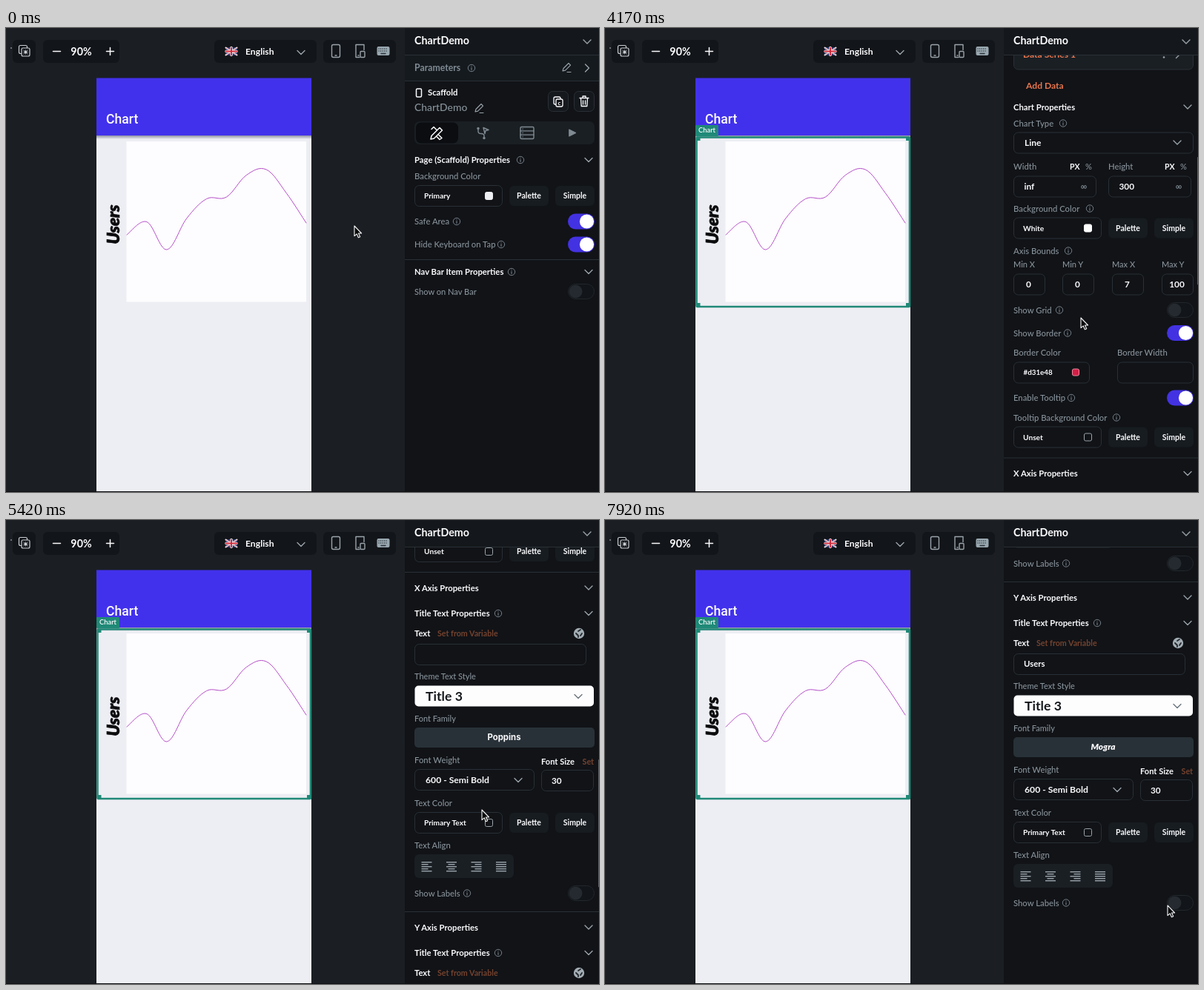
Write an HTML page that moves like this. It is 800 px wide and 626 px high and loops after 8000 ms.

```html
<!DOCTYPE html>
<html lang="en">
<head>
<meta charset="utf-8">
<title>Chart builder</title>
<style>
  html, body { margin: 0; width: 100%; height: 100%; overflow: hidden; background: #1b1f23; }
  svg { display: block; width: 800px; height: 626px; font-family: Lato, sans-serif; }
</style>
</head>
<body>
<svg id="stage" viewBox="0 0 800 626"></svg>
<script>
const WHITE = '#fbfbfd', GRAY = '#87929a', ICON = '#9aa4ab', LINE = '#293036';
const PANEL = '#111317', RAISED = '#1a1f24', ORANGE = '#e8764f', BROWN = '#75432f', BLUE = '#4332e2';

// Drawing helpers: each returns SVG markup.
const text = (x, y, s, size = 11.3, fill = WHITE, weight = 700, extra = '') =>
  `<text x="${x}" y="${y}" font-size="${size}" fill="${fill}" font-weight="${weight}" ${extra}>${s}</text>`;
const centered = (x, y, s, size, fill, weight, extra = '') =>
  text(x, y, s, size, fill, weight, 'text-anchor="middle" ' + extra);
const label = (x, y, s, size = 11.3) => text(x, y, s, size, GRAY, 500);
const box = (x, y, w, h, fill = 'none', r = 0, stroke = 'none', sw = 1) =>
  `<rect x="${x}" y="${y}" width="${w}" height="${h}" rx="${r}" fill="${fill}" stroke="${stroke}" stroke-width="${sw}"/>`;
const path = (d, stroke = ICON, sw = 1.3, fill = 'none') =>
  `<path d="${d}" stroke="${stroke}" stroke-width="${sw}" fill="${fill}" stroke-linecap="round" stroke-linejoin="round"/>`;
const dot = (x, y, r, fill, stroke = 'none', sw = 1) =>
  `<circle cx="${x}" cy="${y}" r="${r}" fill="${fill}" stroke="${stroke}" stroke-width="${sw}"/>`;
const shift = (y, s, id = '') => `<g ${id && `id="${id}"`} transform="translate(0 ${y})">${s}</g>`;

const down = (x = 786, y, c = ICON) => path(`M${x - 5} ${y - 2.5}l5 5 5-5`, c, 1.4);
const right = (x, y) => path(`M${x - 2.5} ${y - 5}l5 5-5 5`, ICON, 1.4);
const info = (x, y) => dot(x, y, 4.7, 'none', '#76818a') + path(`M${x} ${y - .4}v2.8M${x} ${y - 2.4}v.1`, '#76818a', 1.1);
const pencil = (x, y) => path(`M${x - 5} ${y + 4}l1-3.5 7-7 2.6 2.6-7 7ZM${x + 1} ${y + 5.5}h5`, ICON, 1.1);
const rule = y => box(538, y, 262, 1, LINE);
const input = (x, y, w, h = 29) => box(x + .5, y + .5, w - 1, h - 1, PANEL, 6, LINE);
const section = (cy, s, infoX) => text(551, cy + 4, s) + (infoX ? info(infoX, cy) : '') + down(786, cy);
const field = (cy, s, infoX) => label(551, cy + 4, s) + info(infoX, cy);
const toggle = (cy, on) => on
  ? box(758, cy - 10.5, 36, 21, BLUE, 10.5) + dot(783.5, cy, 9.6, '#fff')
  : box(758.5, cy - 10, 35, 20, '#121519', 10, '#22282d') + dot(768.5, cy, 9, '#242a30');
const chip = (x, cy, s) => box(x, cy - 13.5, 53, 27, '#171c20', 6) + centered(x + 26.5, cy + 3.7, s, 10.5);
const colorRow = (cy, s, fill) => input(551, cy - 14.5, 119) + text(564, cy + 3.7, s, 10.2) +
  box(646.5, cy - 5, 10, 10, fill, 2, fill === PANEL ? ICON : fill) + chip(679, cy, 'Palette') + chip(741, cy, 'Simple');
const iconButton = (x, cy) => box(x + .5, cy - 13.5, 27, 27, '#15191d', 6, LINE);

const tabs = cy =>
  box(551, cy - 15.5, 243, 31, '#1a1f23', 7) + box(553, cy - 14, 57, 28, '#0b0d10', 7) +
  path(`M574 ${cy + 4}l11-11 3.5 3.5-11 11-4.5 1ZM574 ${cy - 5}l3-3 4 4M584 ${cy + 3}l4 4-3 2-4-4`, WHITE, 1.5) +
  path(`M637 ${cy - 6}v4q0 3 4 3t4 3v3M644 ${cy - 7}l7 3-4 1-1 4Z`, '#7f8a92', 1.4) +
  dot(637, cy - 6, 1.7, '#7f8a92') + dot(645, cy + 7, 1.7, '#7f8a92') +
  box(694, cy - 8, 18, 16, 'none', 1.5, '#7f8a92', 1.4) +
  path(`M694 ${cy - 2.7}h18M694 ${cy + 2.7}h18M697 ${cy - 5.3}h.2M697 ${cy}h.2M697 ${cy + 5.3}h.2`, '#7f8a92') +
  path(`M760 ${cy - 4.5}l9 4.5-9 4.5Z`, '#7f8a92', 1, '#7f8a92');

const scaffoldPanel = () =>
  box(538, 37, 262, 34, '#151a1e') + text(551, 58, 'Parameters', 12.3, '#7f8b94') + info(628, 54) +
  pencil(756, 54) + right(784, 54) + rule(71) +
  box(553.5, 82, 7, 11, 'none', 1.5, WHITE, 1.5) + text(569, 91, 'Scaffold') +
  label(551, 112, 'ChartDemo', 13.9) + pencil(638, 109) +
  iconButton(731, 99) + box(739, 93, 9, 10, 'none', 2, WHITE, 1.3) + box(742, 96, 9, 10, PANEL, 2, WHITE, 1.3) +
  centered(746.5, 103.5, 'c', 8) + iconButton(766, 99) +
  path('M774 94.5h12M778 94v-2h4v2M775.5 95l.7 10.5h7.6l.7-10.5M778.5 98v5M781.5 98v5', WHITE) +
  tabs(141.5) + section(178, 'Page (Scaffold) Properties', 694) + label(551, 204, 'Background Color') +
  colorRow(226.5, 'Primary', '#edeff3') + field(261, 'Safe Area', 608) + toggle(261, true) +
  field(292, 'Hide Keyboard on Tap', 668) + toggle(292, true) + rule(312) +
  section(329, 'Nav Bar Item Properties', 682) + label(551, 359.5, 'Show on Nav Bar', 11.1) + toggle(355.5);

const slider = (y, s) => label(551, y - 16, s, 10.3) + box(556, y - 1, 179, 2, '#5b6064', 1) +
  dot(645, y, 5.2, '#a5a8ab') + input(753, y - 23, 41, 31);

const layoutPart = () =>
  path('M552 47v10h11M554 54l3-4 2 2 4-4', WHITE, 1.2) + text(569, 56, 'Chart') +
  label(551, 77, 'Chart', 14) + pencil(602, 74) + iconButton(731, 64) +
  path('M738.5 61l3-4h7l3 4-6.5 8ZM738.5 61h13M742 61l3 7 3-7', WHITE) + iconButton(766, 64) +
  box(774, 58, 12, 12, 'none', 2, WHITE, 1.3) + path('M777 62h.2M777 66h.2M780 62h3M780 66h3M785 57v4M783 59h4', WHITE) +
  tabs(106.5) + text(551, 150, 'Conditional Visibility') + info(666, 146) + toggle(146) + rule(166) +
  text(551, 187, 'Responsive Visibility') + info(665, 183) + right(786, 183) + rule(200) +
  section(216, 'Padding &amp; Alignment', 668) + field(239, 'Padding', 605) +
  path('M650 235.5h5.5a4 4 0 0 1 0 8h-5M650 235.5l2.5-2.5M650 235.5l2.5 2.5', ICON) +
  box(552, 252, 113, 72, '#15191d', 6, '#353c42', 1.6) + box(596, 276, 24, 24, '#0d0f12', 7) +
  [['T', 608, 268], ['L', 568, 291.5], ['R', 648.5, 291.5], ['B', 608, 315]].map(([s, x, y]) => centered(x, y, s, 10.5, GRAY, 500)).join('') +
  box(604.5, 286.5, 7, 6, 'none', 1, WHITE, 1.3) + path('M606 286v-2a2 2 0 0 1 4 0v2M608 289v1', WHITE) +
  label(683, 267, 'Expansion') + box(747.5, 254.5, 17, 17, '#0d0f12', 4, WHITE, 1.4) +
  path('M751 258l3 3M761 258l-3 3M751 268l3-3M761 268l-3-3', WHITE, 1.6) +
  box(775.5, 254.5, 17, 17, 'none', 4, '#7f8a92', 1.2) + path('M781 259l3-2 3 2M781 267l3 2 3-2M780 260l-2 3 2 3M788 260l2 3-2 3', '#7f8a92') +
  text(683, 304, 'Flex', 11.3, GRAY, 600, 'font-style="italic"') + info(717, 300) + input(753, 285, 41, 30) +
  text(551, 344.5, 'Alignment') + info(615, 339) +
  slider(387, 'Horizontal Alignment') + slider(433.5, 'Vertical Alignment') + rule(454) +
  section(471, 'Chart Data') + box(551.5, 487.5, 242, 41, RAISED, 6, LINE) + text(564, 512, 'Data Series 1', 12.1, ORANGE) +
  [504, 508, 512].map(y => dot(754, y, 1.3, ICON)).join('') + right(773, 508) +
  text(568, 554, 'Add Data', 12.1, ORANGE) + section(579, 'Chart Properties') + field(601, 'Chart Type', 618);

const sizeInput = (x, name, value) => label(x, 91, name) + text(x + 76, 91, 'PX', 10.6) + label(x + 97, 91, '%', 11) +
  input(x, 100, 112) + text(x + 14.5, 118, value, 11.8) + centered(x + 95, 118, '∞', 12, GRAY, 500);

const propertyPart = () =>
  input(551, 41, 243) + text(566, 59.5, 'Line', 12) + down(772, 55) +
  sizeInput(551, 'Width', 'inf') + sizeInput(679, 'Height', '300') +
  field(144, 'Background Color', 654) + colorRow(170.5, 'White', '#fff') + field(201, 'Axis Bounds', 625) +
  [['Min X', 551, 0], ['Min Y', 617, 0], ['Max X', 684, 7], ['Max Y', 751, 100]].map(([s, x, v]) =>
    label(x, 223.5, s, 11) + input(x, 232, 43) + centered(x + 20.5, 250.5, v, 11.8)).join('') +
  field(281, 'Show Grid', 613) + toggle(281) + field(312, 'Show Border', 624) + toggle(312, true) +
  label(551, 342, 'Border Color') + label(691, 342, 'Border Width') + input(551, 351, 103) + text(564.5, 368.5, '#d31e48', 9.8) +
  box(630.5, 360.5, 9, 9, '#d31e48', 2, '#e98a9d') + input(691, 351, 103) +
  field(399.5, 'Enable Tooltip', 629) + toggle(399.5, true) +
  field(426, 'Tooltip Background Color', 690) + colorRow(452.5, 'Unset', PANEL);

const alignIcon = (x, kind) => [0, 1, 2, 3, 4].map(i => {
  const w = kind === 3 || i % 2 === 0 ? 14 : 9;
  return box(x - 7 + (14 - w) * [0, .5, 1, 0][kind], 461 + i * 3, w, 1.4, ICON);
}).join('');

const axisPart = (axis, value, font) =>
  rule(70) + section(91.5, axis + ' Axis Properties') + section(126, 'Title Text Properties', 664) +
  text(551, 157, 'Text') + text(582, 156.5, 'Set from Variable', 10.7, BROWN) +
  dot(773, 153, 7.2, '#a3adb4') + path('M769 153l3 3v2M775 148l-3 2M777 153l-2 3', '#23282d', 1.8) +
  input(551, 167, 232) + text(565, 185, value, 11.4) + label(551, 215, 'Theme Text Style', 11) +
  box(551.5, 223.5, 241.5, 28, '#fdfdfe', 5) + text(566, 244, 'Title 3', 17.7, '#15181c') + down(772, 238, '#6b757d') +
  label(551, 272, 'Font Family', 11) + box(551, 280, 243, 27, '#283138', 5) + font +
  label(551, 328, 'Font Weight') + text(722, 329.5, 'Font Size', 11.1) + text(777.5, 329.5, 'Set', 10.8, BROWN) +
  input(551, 336, 162) + text(566, 355.3, '600 - Semi Bold', 12.2) + down(691, 351) +
  input(722, 337, 71) + text(736, 356, '30', 11.8) + label(551, 386, 'Text Color') +
  colorRow(408.5, 'Primary Text', PANEL) + label(551, 443, 'Text Align') + box(551, 451, 134, 32, RAISED, 6) +
  [567.5, 601, 634.5, 668].map(alignIcon).join('') + field(503.5, 'Show Labels', 622) + toggle(503.5);

const chartPanel = () => layoutPart() + shift(572, propertyPart()) +
  shift(982, axisPart('X', '', centered(672, 297, 'Poppins', 11.4, WHITE, 700, 'font-family="Inter, sans-serif"'))) +
  shift(1440, axisPart('Y', 'Users', centered(672, 296.5, 'Mogra', 11.8, WHITE, 900, 'font-style="italic"')));

const toolbar = () => [[9, 31], [50, 103], [281, 138], [428, 98]].map(([x, w]) => box(x, 16, w, 31, '#121519', 6)).join('') +
  dot(7, 27, 1, '#858b90') +
  box(17.5, 23.5, 11, 11, 'none', 2, '#c9ced2', 1.2) + box(21, 27, 11, 11, '#121519', 2, '#c9ced2', 1.2) +
  path('M24 30l5 5M29 30l-5 5M24 32.5h5M26.5 30v5', '#c9ced2', 1) +
  path('M63.5 31.5h10M135.5 31.5h10M140.5 26.5v10', WHITE, 1.5) + centered(101.5, 36.5, '90%', 14.3) +
  box(296, 26, 16, 11, '#26386f') + path('M296.5 26.5l15 10M311.5 26.5l-15 10', '#fff', 2) + path('M297 27l14 9M311 27l-14 9', '#d13a48', .7) +
  path('M304 26.5v10M297 31.5h14', '#fff', 3.4) + path('M304 26.5v10M296.5 31.5h15', '#d0283a', 1.9) +
  text(323, 35.7, 'English', 12.2) + down(398, 33) +
  box(439.5, 22.5, 11, 17, 'none', 2, ICON, 1.4) + path('M444 37h2', ICON) +
  path('M477 39.5h-5v-17h11v7M475 37h1', ICON, 1.4) + box(478, 31.5, 6, 8, 'none', 1, ICON, 1.4) +
  box(500.5, 25, 17, 12, '#98a7b0', 2) + path('M503 28h12M503 31h12', '#2c353b', 1.3).replace('<path', '<path stroke-dasharray=".1 2.4"') + path('M506 34.5h6', '#2c353b');

// Smooth line through evenly spaced values, with tangents from the neighbouring points.
function curve(values, left, width, smoothness = .35) {
  const step = width / (values.length - 1);
  const at = i => {
    const k = Math.min(Math.max(i, 0), values.length - 1);
    return [left + k * step, values[k]];
  };
  const handle = (i, sign) => at(i).map((v, k) => v + sign * smoothness * (at(i + 1)[k] - at(i - 1)[k]) / 2);
  return 'M' + at(0) + values.slice(1).map((_, i) => `C${handle(i, 1)} ${handle(i + 1, -1)} ${at(i + 1)}`).join('');
}

const phone = () =>
  box(122, 68, 290, 558, '#edeef3') + box(122, 145, 290, 5, 'url(#shade)') + box(122, 67.5, 290, 77.5, '#4231ec') +
  text(135, 129.3, 'Chart', 17.6, WHITE, 500, 'font-family="Roboto, sans-serif"') +
  box(162.5, 153, 242.5, 216.5, '#fdfcfe') +
  path(curve([279, 261.5, 299, 257, 230.5, 228, 198.5, 191, 222.5, 263], 163, 242), '#b44fc9', 1) +
  `<text transform="translate(153.2 291.5) rotate(-90)" font-size="22.4" font-weight="900" font-style="italic" fill="#0c0c0e" stroke="#0c0c0e" stroke-width=".7">Users</text>`;

const outline = (id, c) => `<g id="${id}">` + box(123.5, 147.5, 287.5, 228.5, 'none', 1, c, 2.6) +
  [[123, 147], [406, 147], [123, 371], [406, 371]].map(([x, y]) => box(x, y, 5.5, 5, c)).join('') +
  box(122, 131, 31, 15, c, 1) + centered(137.5, 141.3, 'Chart', 9.4, WHITE, 600) + '</g>';

const stage = document.getElementById('stage');
stage.innerHTML = `<defs><linearGradient id="shade" x2="0" y2="1"><stop stop-color="#8f91a4"/><stop offset="1" stop-color="#edeef3"/></linearGradient></defs>` +
  box(0, 0, 800, 626, '#1b1f23') + toolbar() + phone() + outline('hover', '#ea7f4a') + outline('selected', '#1f8977') +
  `<g id="edge">${box(533, 0, 5, 538, '#4b4f52')}</g>` + box(538, 0, 262, 626, PANEL) +
  `<g id="scaffold">${scaffoldPanel()}</g>` + shift(0, chartPanel(), 'chart') +
  box(538, 0, 262, 36, '#14181c') + text(551, 22, 'ChartDemo', 14.3) + down(784, 18.5) + rule(36) +
  `<g id="thumb">${box(799, 0, 1, 172, '#5c6063')}</g>` + box(0, 625, 800, 1, '#0d0f11') +
  `<g id="cursor"><g id="arrow">${path('M0 0V13.6L3.2 10.8L5.4 15.8L7.7 14.8L5.5 10H9.6Z', '#f4f4f4', 1.1, '#08090b')}</g>
   <g id="hand">${path('M0 1.2q1.3-1.4 2 .2l1 4.2q2-.5 2.2.9 1.7-.5 2 .8 1.8-.2 1.8 1.6l-.3 3.2-1.4 3H1.8L-2.6 9q-1-1.8.8-1.9l2.5 1.6Z', '#0a0b0d', 1, '#fff')}</g></g>`;

// The picture advances 12 times a second; motion tables hold [step, values...].
const LOOP = 8000, STEPS = 96, CLICK = 26, SCROLL = 41;
const pointer = [[0, 470, 267], [9, 440, 264], [18, 309, 229], [29, 309, 229], [38, 642, 391],
  [77, 642, 391], [91, 759, 520], [STEPS, 759, 520]];
const scrolling = [[0, 0], [SCROLL, 0], [47, 330], [51, 520], [55, 572], [59, 600], [62, 760],
  [65, 982], [67, 1260], [69, 1427], [STEPS, 1427]];
const fading = [[0, 0], [SCROLL, 0], [42, 1], [75, 1], [78, 0], [STEPS, 0]];

const linear = p => p, smooth = p => p * p * (3 - 2 * p);
function sample(table, step, ease = linear) {
  const i = table.findIndex(row => row[0] > step);
  const a = table[i - 1], b = table[i];
  const p = ease((step - a[0]) / (b[0] - a[0]));
  return a.slice(1).map((v, k) => v + (b[k + 1] - v) * p);
}

const el = Object.fromEntries([...stage.querySelectorAll('g[id]')].map(g => [g.id, g]));
const show = (name, on) => el[name].setAttribute('visibility', on ? 'visible' : 'hidden');
const move = (name, x, y) => el[name].setAttribute('transform', `translate(${x.toFixed(2)} ${y.toFixed(2)})`);

function draw(now) {
  const step = Math.floor((now % LOOP + 8) / LOOP * STEPS) % STEPS;
  const [x, y] = sample(pointer, step, smooth);
  const [scroll] = sample(scrolling, step);
  const clicked = step >= CLICK, onSlider = step >= 37 && step <= SCROLL;
  show('hover', !clicked && x < 412);
  show('selected', clicked);
  show('scaffold', !clicked);
  show('chart', clicked);
  show('edge', step >= 35 && step < 45);
  show('arrow', !onSlider);
  show('hand', onSlider);
  move('cursor', x, y);
  move('chart', 0, -scroll);
  move('thumb', 0, 36 + scroll * 590 / 2017);
  el.thumb.setAttribute('opacity', sample(fading, step)[0]);
}
function loop() {
  draw(performance.now());
  requestAnimationFrame(loop);
}
loop();
</script>
</body>
</html>
```
